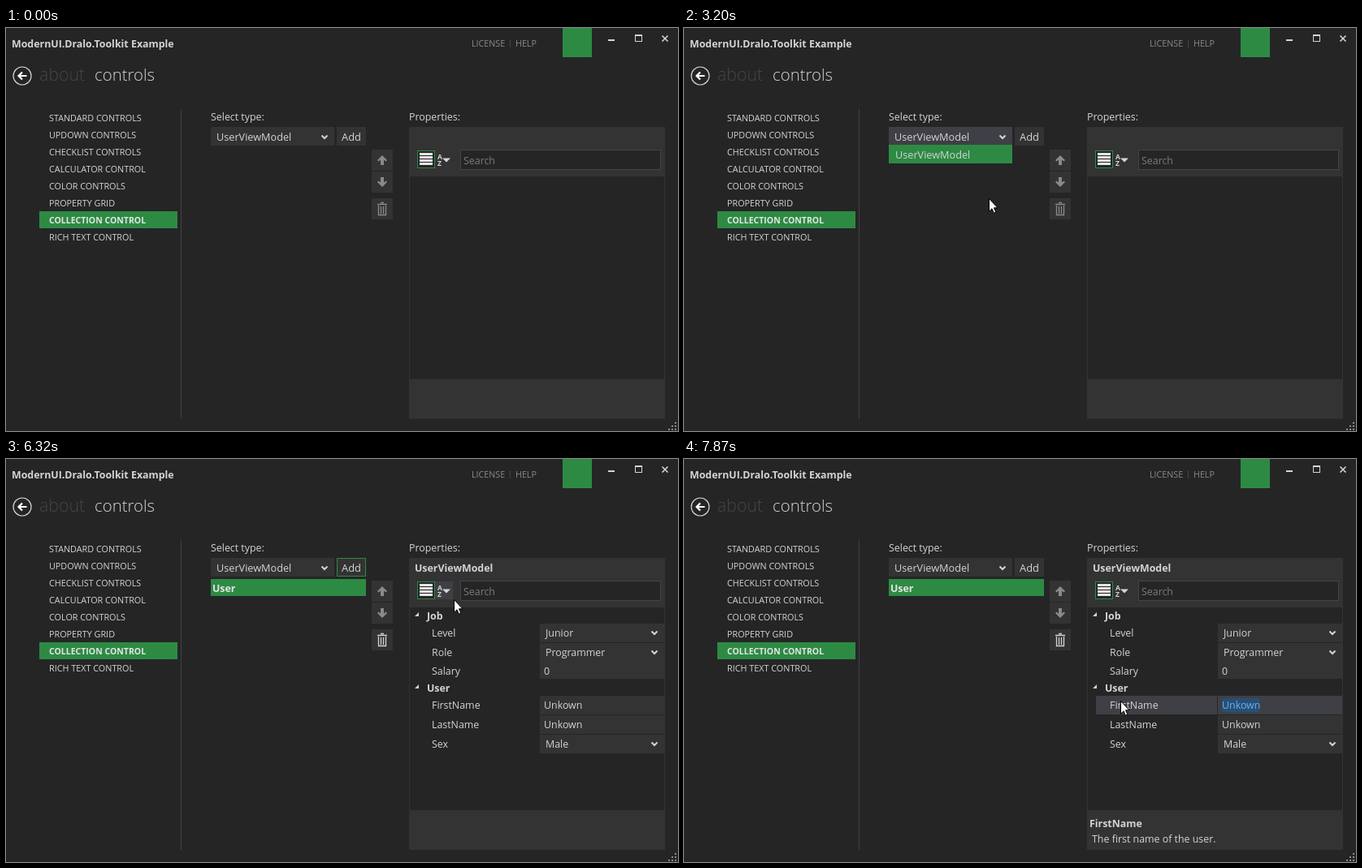
An HTML page with a canvas for the animation above (8000 ms loop, 827 px wide and 497 px high).

```html
<!DOCTYPE html>
<html lang="en">
<head>
<meta charset="utf-8">
<title>Collection control</title>
<style>
html, body { margin: 0; width: 100%; height: 100%; overflow: hidden; background: #252526; }
canvas { display: block; }
</style>
</head>
<body>
<canvas id="stage" width="827" height="497"></canvas>
<script>
const g = document.getElementById('stage').getContext('2d');
const BG = '#252526', PANEL = '#333334', HOVER = '#3f3f46', GREEN = '#2d8a43',
      TEXT = '#d4d4d4', BRIGHT = '#e4e4e4', DIM = '#8a8a8a', LINE = '#434346';
const LOOP = 8000, STEP = 111, START = 310;

// Steps at which the clicks land
const OPEN = 21, PICK = 31, REACT = 36, ADD = 38, FOCUS = 65;

// Cursor stops: arrival step, x, y
const STOPS = [
  [0, 606, 390], [2, 527, 301], [7, 379, 152], [12, 430, 99], [15, 430, 132], [17, 417, 132],
  [20, 390, 132], [26, 375, 210], [29, 381, 164], [34, 430, 132], [46, 391, 150], [49, 421, 166],
  [54, 551, 173], [57, 577, 172], [58, 600, 187], [62, 650, 315], [64, 721, 304], [68, 537, 298]
];

const MENU = ['STANDARD CONTROLS', 'UPDOWN CONTROLS', 'CHECKLIST CONTROLS', 'CALCULATOR CONTROL',
  'COLOR CONTROLS', 'PROPERTY GRID', 'COLLECTION CONTROL', 'RICH TEXT CONTROL'];

const GROUPS = [
  { name: 'Job', y: 198, pitch: 23.5, rows: { Level: 'Junior', Role: 'Programmer', Salary: '0' } },
  { name: 'User', y: 287, pitch: 24, rows: { FirstName: 'Unkown', LastName: 'Unkown', Sex: 'Male' } }
];
const COMBOS = ['Level', 'Role', 'Sex'];

function box(x, y, w, h, fill, border) {
  g.fillStyle = fill;
  g.fillRect(x, y, w, h);
  if (border) {
    g.strokeStyle = border;
    g.lineWidth = 1;
    g.strokeRect(x + .5, y + .5, w - 1, h - 1);
  }
}

function text(s, x, y, color = TEXT, size = 12.4, weight = 400) {
  g.font = `${weight} ${size}px "Open Sans", "Noto Sans", sans-serif`;
  g.fillStyle = color;
  g.fillText(s, x, y);
}

const bold = (s, x, y, color = TEXT) => text(s, x, y, color, 12.4, 700);

function shape(d, x, y, fill, stroke, width = 1) {
  const p = new Path2D(d);
  g.save();
  g.translate(x, y);
  if (fill) { g.fillStyle = fill; g.fill(p); }
  if (stroke) { g.strokeStyle = stroke; g.lineWidth = width; g.stroke(p); }
  g.restore();
}

const chevron = (x, y) => shape('M-3.5 -1.5L0 2L3.5 -1.5', x, y, null, TEXT, 2);
const inside = (c, x, y, w, h) => c && c.x >= x && c.x < x + w && c.y >= y && c.y < y + h;

// The cursor rests at a stop, then eases to the next one in at most four steps
function cursorAt(n) {
  if (n < 0) return null;
  const last = STOPS.length - 1, found = STOPS.findIndex(s => s[0] > n);
  const i = found < 0 ? last : found;
  const [from, x, y] = STOPS[i - 1], [to, u, v] = STOPS[i];
  const leave = Math.max(from, to - 4);
  const p = Math.min(1, Math.max(0, (n - leave) / (to - leave))), k = p * p * (3 - 2 * p);
  return { x: Math.round(x + (u - x) * k), y: Math.round(y + (v - y) * k) };
}

function drawWindow() {
  box(0, 0, 827, 497, BG);
  bold('ModernUI.Dralo.Toolkit Example', 7, 24);
  text('LICENSE', 573, 23, DIM, 10.7);
  text('HELP', 627, 23, DIM, 10.7);
  box(620, 14, 1, 10, LINE);
  box(685, 0, 36, 36, GREEN);
  box(741, 14, 8, 2, TEXT);
  box(774, 8, 9, 9, BG, TEXT);
  box(774, 8, 9, 2, TEXT);
  shape('M-3.5 -3.5L3.5 3.5M3.5 -3.5L-3.5 3.5', 811, 13, null, TEXT, 1.6);

  shape('M11 0A11 11 0 1 1 -11 0A11 11 0 1 1 11 0', 20, 59, null, TEXT, 1.2);
  shape('M5.5 0H-4M0 -4.5L-4.5 0L0 4.5', 20, 59, null, '#fff', 2.2);
  text('about', 41, 65, '#454546', 21.3, 300);
  text('controls', 109, 65, TEXT, 20.4, 300);

  box(215, 100, 1, 382, LINE);
  MENU.forEach((s, i) => {
    const on = s === 'COLLECTION CONTROL', y = 100 + 21 * i;
    if (on) box(41, y, 170, 21, GREEN);
    text(s, 53, y + 15, on ? BRIGHT : TEXT, on ? 10.5 : 10.8, on ? 700 : 400);
  });

  for (let r = 0; r < 3; r++)
    for (let c = 2 - r; c < 3; c++) box(815 + 4 * c, 486 + 4 * r, 2, 2, DIM);
}

function drawEditor(n, c) {
  const open = n >= OPEN && n < PICK, busy = n >= PICK && n < REACT, added = n >= ADD;
  const comboHot = open || busy || inside(c, 252, 122, 152, 23);
  const addHot = !busy && inside(c, 407, 122, 36, 23);
  text('Select type:', 252, 114);
  box(252, 122, 152, 23, comboHot ? HOVER : PANEL);
  text('UserViewModel', 259, 139, TEXT, 12.7);
  chevron(392, 134);
  box(407, 122, 36, 23, addHot ? HOVER : PANEL, added && n < FOCUS ? GREEN : null);
  text('Add', 413, 139, TEXT, 12.9);

  for (const y of [150, 177, 210]) box(450, y, 26, 26, PANEL);
  shape('M0 -6L6 0L4.5 1.5L2 -.5V6H-2V-.5L-4.5 1.5L-6 0Z', 463, 163, DIM);
  shape('M0 6L6 0L4.5 -1.5L2 .5V-6H-2V.5L-4.5 -1.5L-6 0Z', 463, 190, DIM);
  shape('M-6 -5.5H6M-2 -7.5H2M-4.5 -4V7.5H4.5V-4M-1.5 -3V6M1.5 -3V6', 463, 223, null, added ? TEXT : DIM, 1.3);

  if (added) {
    box(252, 148, 191, 21, GREEN);
    bold('User', 254, 164, BRIGHT);
  }
  if (open) {
    box(252, 144, 152, 23, GREEN);
    text('UserViewModel', 260, 161, TEXT, 12.7);
  }
}

function drawRow(label, value, y, c, focused) {
  const combo = COMBOS.includes(label), hot = focused || inside(c, 507, y, 303, 23);
  if (hot) box(507, y, 149, 23, HOVER);
  box(657, y, 153, label === 'Salary' ? 21 : 23, hot ? HOVER : PANEL);
  text(label, 524, y + 16);
  if (focused) box(662, y + 3, 46, 17, '#264f78');
  text(value, combo ? 664 : 662, y + 16, focused ? '#6fb0e6' : TEXT);
  if (combo) chevron(798, y + 11);
}

function drawProperties(n, c) {
  text('Properties:', 496, 114);
  box(496, 122, 315, 360, BG, PANEL);
  box(496, 122, 315, 61, PANEL);
  box(496, 433, 315, 49, PANEL);

  box(506, 151, 22, 22, BG, GREEN);
  for (let y = 154; y < 170; y += 4) box(509, y, 16, 3, BRIGHT);
  if (inside(c, 528, 151, 24, 23)) box(528, 151, 22, 22, HOVER);
  text('A', 531, 162, TEXT, 8.5, 700);
  text('Z', 531, 170, TEXT, 8.5, 700);
  shape('M-5 -2.5H5L0 2.5Z', 542, 163, TEXT);
  box(559, 150, 247, 25, BG, inside(c, 559, 150, 247, 25) ? DIM : LINE);
  text('Search', 563, 168, '#7c7c7c');

  if (n < ADD) return;
  const focused = n >= FOCUS;
  bold('UserViewModel', 503, 139);
  for (const { name, y, pitch, rows } of GROUPS) {
    shape('M5 0V5H0Z', 503, y - 9, TEXT);
    bold(name, 518, y);
    Object.entries(rows).forEach(([label, value], i) =>
      drawRow(label, value, Math.round(y + 5 + pitch * i), c, focused && label === 'FirstName'));
  }
  if (focused) {
    bold('FirstName', 499, 454);
    text('The first name of the user.', 502, 473);
  }
}

function draw(t) {
  const n = Math.floor((t - START) / STEP), c = cursorAt(n);
  drawWindow();
  drawEditor(n, c);
  drawProperties(n, c);
  if (c) shape('M.5 .5V16.2L4 12.8L6.3 18.2L8.8 17.1L6.5 11.8H11Z', c.x, c.y, '#fff', '#000');
}

const begin = performance.now();
function tick() {
  draw((performance.now() - begin) % LOOP);
  requestAnimationFrame(tick);
}
tick();
</script>
</body>
</html>
```
